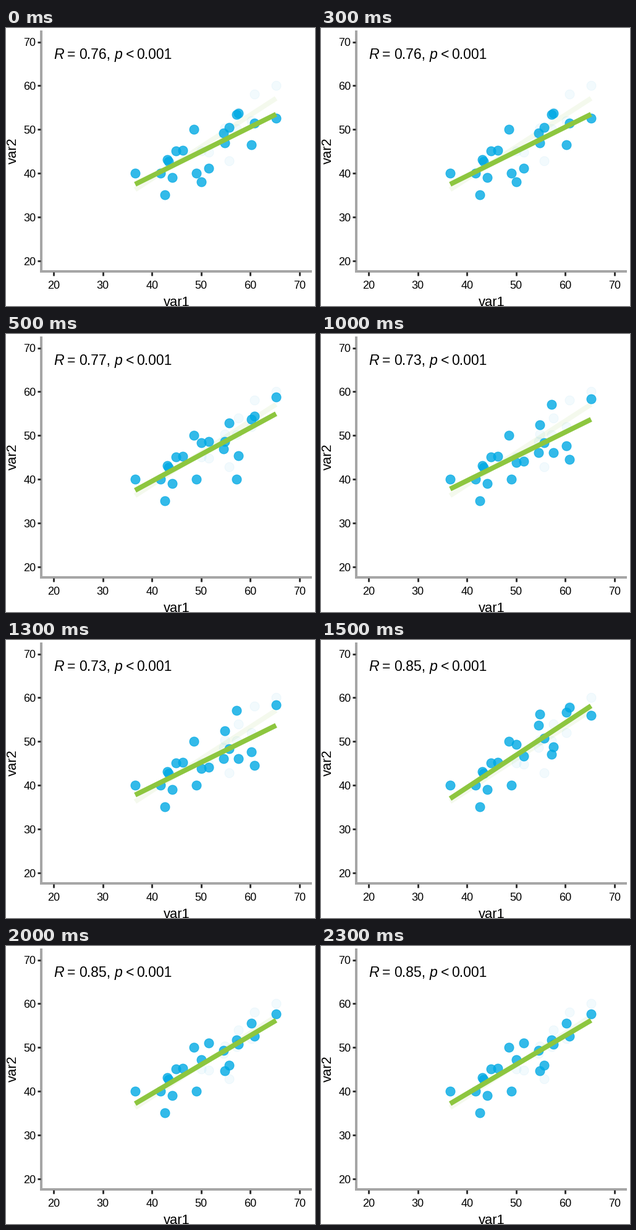
Animation, 500 px wide and 450 px high, one loop 2.5 s. Source, as a matplotlib script:

```python
import numpy as np
import matplotlib.pyplot as plt
from matplotlib.animation import FuncAnimation

W, H, DPI = 500, 450, 100
BLUE, GREEN = "#00A9E4", "#8DC63F"
PX = 72 / DPI  # points per pixel

# Positions are in stage pixels, y downwards.
FIXED_X = [209, 250, 257, 261, 263, 269, 275, 286, 304, 308]
FIXED_Y = [235, 235, 270, 213, 216, 242, 199, 198, 164, 235]
MOVING_X = [316, 328, 352, 354, 361, 373, 376, 397, 402, 437]
GHOST_Y = [199, 201, 174, 162, 215, 163, 136, 150, 107, 93]
SAMPLES = [
    ("0.76", [249, 227, 170, 186, 161, 140, 138, 189, 154, 146]),
    ("0.77", [176, 174, 186, 174, 144, 235, 197, 138, 133, 102]),
    ("0.73", [208, 206, 192, 147, 176, 114, 192, 181, 203, 105]),
    ("0.85", [169, 188, 138, 120, 159, 185, 173, 117, 109, 122]),
    ("0.85", [184, 157, 169, 202, 193, 152, 159, 125, 146, 110]),
]
XS = np.array(FIXED_X + MOVING_X)
ENDS = np.array([XS.min(), XS.max()])

plt.rcParams["font.family"] = "Liberation Sans"
fig = plt.figure(figsize=(W / DPI, H / DPI), dpi=DPI, facecolor="white")
ax = fig.add_axes([0, 0, 1, 1])
ax.set_xlim(0, W)
ax.set_ylim(H, 0)
ax.axis("off")


def label(x, y, text, size, **kw):
    kw.setdefault("va", "baseline")
    return ax.text(x, y, text, fontsize=size * PX, color="black", **kw)


def stroke(x, y, color, width, **kw):
    return ax.plot(x, y, color=color, lw=width * PX,
                   solid_capstyle="butt", **kw)[0]


def dots(x, y, alpha, z):
    return ax.scatter(x, y, s=(15 * PX) ** 2, facecolor=BLUE, edgecolor=BLUE,
                      linewidth=1 * PX, alpha=alpha, zorder=z)


def fit(y):
    slope, base = np.polyfit(XS, y, 1)
    return slope * ENDS + base


def draw_axes():
    stroke([57, 57], [4, 396], "#A6A6A6", 4)
    stroke([55, 495], [394, 394], "#A6A6A6", 4)
    for i in range(6):
        x, y = 77 + 79.6 * i, 377 - 70.9 * i
        stroke([x, x], [395, 401], "#333333", 3)
        stroke([51, 56], [y, y], "#333333", 3)
        label(x, 421.5, str(20 + 10 * i), 18, ha="center")
        label(48.5, y + 6.5, str(20 + 10 * i), 18, ha="right")
    label(276, 449.5, "var1", 22, ha="center")
    label(22, 199, "var2", 22, ha="right", va="center",
          rotation=90, rotation_mode="default")


draw_axes()
ghost = np.array(FIXED_Y + GHOST_Y)
dots(MOVING_X, GHOST_Y, 0.05, 2)
stroke(ENDS, fit(ghost), GREEN, 8, alpha=0.09, zorder=3)

label(77, 50, "R", 23, style="italic")
label(99, 50, "=", 23)
r_text = label(118, 50, "", 23)
label(176, 50, "p", 23, style="italic")
label(194, 50, "<", 23)
label(211.5, 50, "0.001", 23)

points = dots(XS, ghost, 0.8, 4)
trend = stroke(ENDS, fit(ghost), GREEN, 8, zorder=5)


def update(frame):
    r, moving = SAMPLES[frame]
    ys = np.array(FIXED_Y + moving)
    points.set_offsets(np.column_stack([XS, ys]))
    trend.set_ydata(fit(ys))
    r_text.set_text(r + ",")
    return points, trend, r_text


anim = FuncAnimation(fig, update, frames=len(SAMPLES), interval=500,
                     repeat=True, repeat_delay=0)
plt.show()
```
